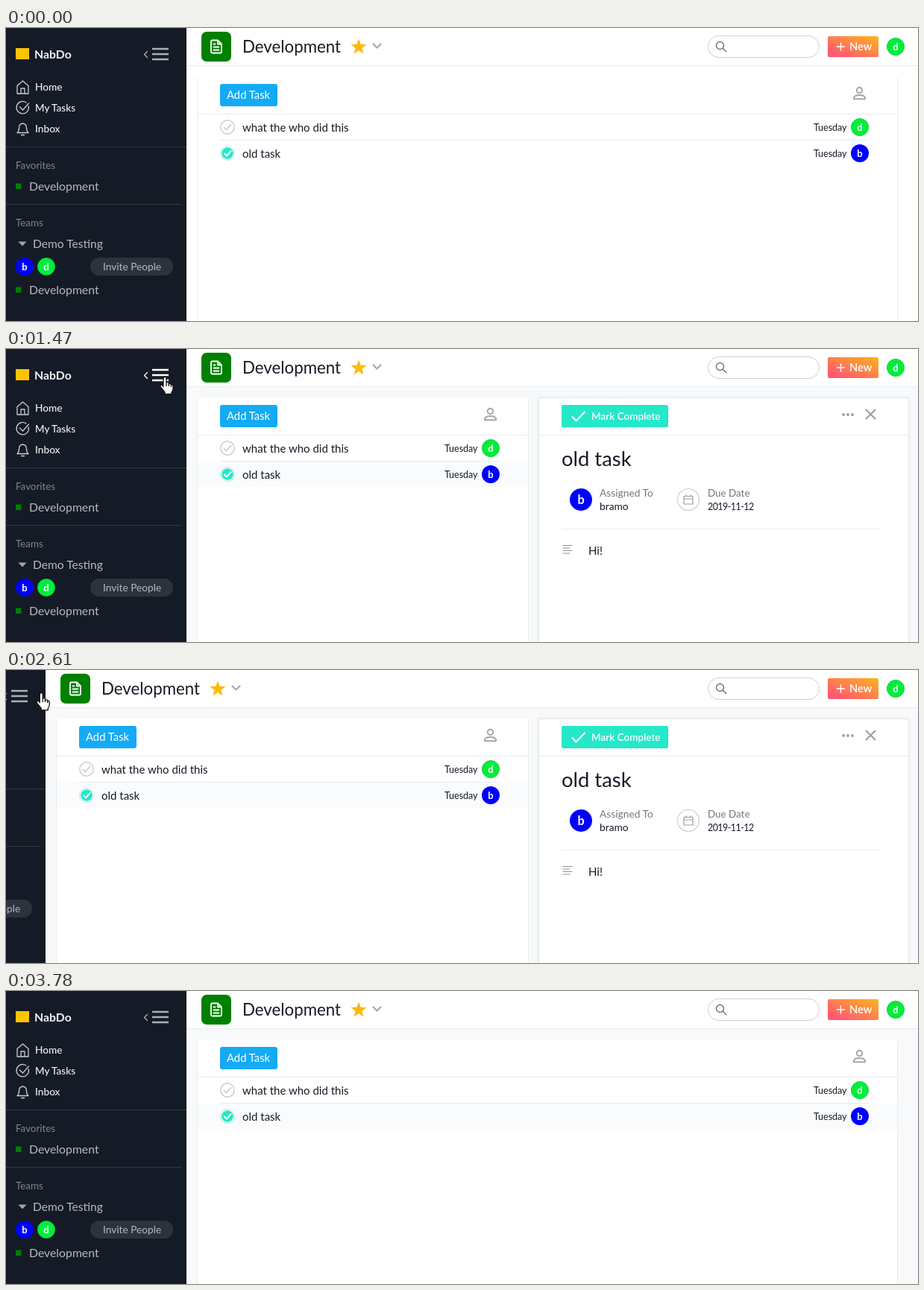
An HTML page that plays this animation: 1223x393 px, repeating every 4.24 s.

```html
<!DOCTYPE html>
<html lang="en">
<head>
<meta charset="utf-8">
<title>Task board</title>
<style>
html, body { margin: 0; height: 100%; overflow: hidden; background: #fff; }
svg { display: block; width: 100vw; height: 100vh; }
text { font-family: Lato, "Open Sans", sans-serif; fill: #151b26; }
.line { fill: none; stroke-linecap: round; stroke-linejoin: round; }
.rule { stroke: #e8ecee; }
.nav { font-size: 13.7px; font-weight: 500; fill: #f0f2f4; }
.muted { font-size: 13.4px; fill: #7f868f; }
.proj { font-size: 15.8px; fill: #b6babf; }
.row { font-size: 15px; }
.day { font-size: 12.5px; }
.label { font-size: 13.8px; fill: #6f7782; }
.value { font-size: 13.8px; }
.av { font-size: 13px; font-weight: 700; fill: #fff; text-anchor: middle; }
.btn { fill: #fff; }
</style>
</head>
<body>
<svg viewBox="0 0 1223 393">
  <defs>
    <linearGradient id="warm" x1="0" y1="1" x2="1" y2="0">
      <stop offset=".15" stop-color="#ff5a70"/><stop offset="1" stop-color="#ffb41c"/>
    </linearGradient>
    <g id="b"><circle r="12" fill="#00f"/><text class="av" y="4.5">b</text></g>
    <g id="d"><circle r="11.6" fill="#00ee3b" stroke="#12c43c" stroke-width=".8"/><text class="av" y="4.5">d</text></g>
    <path id="bars" class="line" style="stroke-linecap:butt" stroke-width="2.3" d="M-11-7H11M-11 0H11M-11 7H11"/>
  </defs>

  <rect id="page" width="1223" height="393"/>

  <!-- task list -->
  <rect class="wide" data-a="0" data-b="0" y="65" height="340" rx="3" fill="#fff"/>
  <rect id="row1" class="wide" data-a="0" data-b="0" y="116" height="34" fill="#f6f8f9"/>
  <rect id="row2" class="wide" data-a="0" data-b="0" y="151" height="34"/>
  <rect class="wide" data-a="0" data-b="0" y="115" height="1" fill="#e8ecee"/>
  <rect class="wide" data-a="30" data-b="38" y="150" height="1" fill="#e8ecee"/>
  <g id="left">
    <path class="rule" d="M256.5 67V393"/>
    <rect x="287" y="75" width="77" height="30" rx="3" fill="#14aaf5"/>
    <text class="btn" x="296" y="95" font-size="14.8">Add Task</text>
    <g class="line" stroke="#c9cccf" stroke-width="1.4">
      <circle cx="297" cy="133" r="9.2"/><path d="M292.5 133.5l3 3 6-7" stroke-width="1.7"/>
    </g>
    <circle cx="297" cy="168" r="9.3" fill="#fff" stroke="#a9e6dc"/>
    <circle cx="297" cy="168" r="7.8" fill="#25e8c8"/>
    <path class="line" stroke="#fff" stroke-width="2" d="M293 168.5l3 3 5.5-6.5"/>
    <text class="row" x="317" y="139">what the who did this</text>
    <text class="row" x="317" y="174">old task</text>
  </g>
  <g id="right">
    <path class="rule" d="M1195.5 67V393"/>
    <g class="line" stroke="#a3a6aa" stroke-width="2">
      <circle cx="1144.5" cy="83.5" r="3.7"/><path d="M1137 95.2v-1.6q1-3.6 7.5-3.6t7.5 3.6v1.6z"/>
    </g>
    <text class="day" x="1083" y="138">Tuesday</text><use href="#d" x="1145" y="133"/>
    <text class="day" x="1083" y="173">Tuesday</text><use href="#b" x="1145" y="168"/>
  </g>

  <!-- task detail, laid out at its resting place -->
  <g id="panel">
    <rect x="712" y="63" width="501" height="340" rx="4" fill="#151b26" opacity=".025"/>
    <rect x="714.5" y="65.5" width="496" height="340" rx="3" fill="#fff" stroke="#e3e7ea"/>
    <rect x="745" y="75" width="143" height="30" rx="2" fill="#25e8c8"/>
    <path class="line" stroke="#fff" stroke-width="2.2" d="M759.5 91l5 5.5L776 84.500"/>
    <text class="btn" x="785" y="95" font-size="13.5" font-weight="600">Mark Complete</text>
    <g fill="#9a9da1"><circle cx="1123" cy="88" r="1.9"/><circle cx="1129" cy="88" r="1.9"/><circle cx="1135" cy="88" r="1.9"/></g>
    <path class="line" stroke="#9a9da1" stroke-width="2" d="M1153.500 81.500l12 12m0-12l-12 12"/>
    <path class="rule" d="M715 115.500H1210M745 241.500H1172"/>
    <text x="745" y="157" font-size="27.400">old task</text>
    <use href="#b" transform="translate(771 202) scale(1.25)"/>
    <text class="label" x="796" y="198">Assigned To</text>
    <text class="value" x="796" y="216">bramo</text>
    <g class="line" stroke="#b4b8bc" stroke-width="1.2">
      <circle cx="915" cy="202" r="14.500" stroke="#cbcfd3"/>
      <path d="M909 197.500h12v10.500h-12zM909 201h12M912 195.500v2M918 195.500v2" stroke="#999da2"/>
    </g>
    <text class="label" x="941" y="198" style="font-size:13.4px">Due Date</text>
    <text x="941" y="216" font-size="12.400" letter-spacing="-.5">2019-11-12</text>
    <path class="line" stroke="#8d9196" stroke-width="1.200" d="M747 263.500h12M747 267h9M747 270.500h12M747 274h9"/>
    <text x="781" y="276" font-size="15">Hi!</text>
  </g>

  <!-- header -->
  <rect width="1223" height="50" fill="#fff"/>
  <path class="rule" d="M0 50.500H1223"/>
  <use href="#bars" x="33" y="25" stroke="#111"/>
  <g id="title">
    <rect x="262" y="5" width="40" height="40" rx="7" fill="#008000"/>
    <path class="line" stroke="#fff" stroke-width="1.8" d="M284 16.500h-7.500q-1.500 0-1.500 1.500v14q0 1.500 1.500 1.500h11q1.500 0 1.500-1.500V21.500zv5h5M278.500 25.500h7M278.500 29.500h7M278.500 21.500h2"/>
    <text x="317" y="33" font-size="22.300">Development</text>
    <path id="star" fill="#fcb90d"/>
    <path class="line" stroke="#a6a8ab" stroke-width="2.200" d="M492.500 21.500l5 5 5-5"/>
  </g>
  <g id="tools">
    <rect x="941.500" y="10.500" width="149" height="29" rx="14.500" fill="#fff" stroke="#cbd0d6"/>
    <g class="line" stroke="#6d7277" stroke-width="1.400"><circle cx="957.500" cy="23.500" r="5"/><path d="M961.300 27.300l4.500 4.500"/></g>
    <rect x="1102" y="11" width="68" height="28" rx="2" fill="url(#warm)"/>
    <path class="line" stroke="#fff" stroke-width="1.600" d="M1114.500 25h10M1119.500 20v10"/>
    <text class="btn" x="1131" y="30" font-size="14.700" font-weight="600">New</text>
    <use href="#d" x="1193" y="25"/>
  </g>

  <!-- sidebar -->
  <g id="side">
    <rect width="242" height="393" fill="#151b26"/>
    <rect x="13" y="27" width="18" height="15" fill="#ffc400"/>
    <text class="nav" x="38" y="41" style="font-size:15.8px;font-weight:700">NabDo</text>
    <g id="menu">
      <path class="line" stroke-width="1.300" d="M189.500 31.500l-4 4 4 4"/><use href="#bars" x="207" y="35"/>
    </g>
    <g class="line" stroke="#c9cdd1" stroke-width="1.300">
      <path d="M15 77.500l7.500-6.500 7.500 6.500v10.500h-15zM20 88v-7h5v7"/>
      <path d="M30.300 105a8.200 8.200 0 1 1-3.300-5M18.500 106l4 4 8-9"/>
      <path d="M15 140.500q2.500-2 2.500-6.500 0-5.500 5-6 5 .5 5 6 0 4.500 2.500 6.500zM20.500 143.500h4"/>
    </g>
    <text class="nav" x="39" y="84">Home</text>
    <text class="nav" x="39" y="112" style="font-size:13.5px">My Tasks</text>
    <text class="nav" x="39" y="140">Inbox</text>
    <path stroke="#333943" d="M0 159.500H242M0 236.500H235"/>
    <text class="muted" x="13" y="189">Favorites</text>
    <text class="muted" x="13" y="266">Teams</text>
    <path fill="#008000" d="M13 208.500h7.500v7.500H13zM13 347.500h7.500v7.500H13z"/>
    <text class="proj" x="31" y="218">Development</text>
    <text class="proj" x="31" y="357">Development</text>
    <path fill="#a0a4a9" d="M16.500 286.500h11l-5.500 6z"/>
    <text class="proj" x="36" y="295" style="font-size:15.6px">Demo Testing</text>
    <use href="#b" x="25" y="320"/><use href="#d" x="54" y="320"/>
    <rect x="113" y="308" width="111" height="24" rx="12" fill="#2d323c"/>
    <text class="proj" x="130" y="325" style="font-size:13.7px">Invite People</text>
  </g>

  <g id="scroll">
    <rect x="1209" width="14" height="393" fill="#f1f1f1"/>
    <rect x="1210" y="17" width="13" height="376" fill="#c1c1c1"/>
    <path fill="#8a8a8a" d="M1213 11.500l4-5 4 5z"/>
  </g>

  <g id="cursor" stroke-linejoin="round">
    <path id="hand" fill="#fff" stroke="#111" stroke-width="1.300" d="M-2 2Q0-2 2 2V9V8q2-1.500 3.200.500v1.500q2.300-1.300 3.200 1 2.400-.500 2.600 1.500V16q0 3-2 5v2.500H0V21L-6 13.500Q-6.500 10.500-3.500 11.500L-2 13.500zM2 9v4M5.200 10v3M8.400 11v3"/>
    <path id="beam" fill="none" stroke="#222" stroke-width="1.200" d="M-3.500-7.500H-1L0-6.500 1-7.500H3.500M0-6.500V6.500M-3.500 7.500H-1L0 6.500 1 7.500H3.500"/>
    <path id="arrow" fill="#fff" stroke="#111" d="M0 0V16l3.800-3.500 2.600 6 2.400-1-2.600-5.800h5.200z"/>
  </g>
</svg>
<script>
const LOOP = 4240;
const OPEN = 790, CLOSE = 3430, SLIDE = 282;
const FOLD = 1680, UNFOLD = 2574, FOLD_TIME = 220;
const FOLDED = 244, TRAVEL = 510, BAR = 17;

// time, x, y of the pointer tip
const path = [
  [170, 610, 352], [430, 537, 163], [1030, 537, 163], [1300, 228, 66], [1440, 213, 37],
  [2200, 213, 37], [2460, 34, 26], [2570, 38, 27], [2610, 46, 30], [2700, 160, 62],
  [2970, 606, 137], [3060, 690, 130], [3250, 1122, 93], [3340, 1158, 86],
  [3440, 1158, 86], [3740, 1010, 400]
];

const $ = id => document.getElementById(id);
const shift = (id, x, y = 0) => $(id).setAttribute("transform", `translate(${x} ${y})`);
const show = (id, on) => $(id).style.display = on ? "" : "none";
const wide = document.querySelectorAll(".wide");

$("star").setAttribute("d", "M" + Array.from({ length: 10 }, (_, i) => {
  const r = i % 2 ? 4.6 : 11, a = i * Math.PI / 5;
  return [473 + r * Math.sin(a), 25.5 - r * Math.cos(a)].map(v => v.toFixed(1));
}).join("L") + "z");

// cubic-bezier(.25, .1, .25, 1)
function ease(p) {
  if (p <= 0) return 0;
  if (p >= 1) return 1;
  let lo = 0, hi = 1, u;
  for (let i = 0; i < 16; i++) {
    u = (lo + hi) / 2;
    if (0.75 * u * (1 - u) + u ** 3 < p) lo = u; else hi = u;
  }
  return 0.3 * u * (1 - u) ** 2 + 3 * u * u * (1 - u) + u ** 3;
}

function pointer(t) {
  const i = path.findIndex(k => k[0] > t);
  if (i < 1) return null;
  const [a, b] = [path[i - 1], path[i]];
  const p = (t - a[0]) / (b[0] - a[0]);
  return [a[1] + (b[1] - a[1]) * p, a[2] + (b[2] - a[2]) * p];
}

function draw(t) {
  const fold = ease((t - FOLD) / FOLD_TIME) - ease((t - UNFOLD) / FOLD_TIME);
  const side = -Math.round(FOLDED * fold);
  const opened = t >= OPEN && t < CLOSE;
  const bar = t >= OPEN && t < OPEN + SLIDE ? BAR : 0;
  const away = 1 - ease((t - OPEN) / SLIDE) + ease((t - CLOSE) / SLIDE);
  const L = 257 + side, R = (opened ? 700 : 1195) - bar;

  $("page").setAttribute("fill", t < OPEN ? "#fff" : "#f7f9fa");
  shift("side", side);
  shift("title", Math.max(-194, side));
  shift("left", side);
  shift("right", R - 1195);
  shift("tools", -bar);
  shift("panel", Math.round(TRAVEL * away) - bar);
  show("panel", away < 1);
  show("scroll", bar);
  for (const e of wide) {
    const x = L + +e.dataset.a;
    e.setAttribute("x", x);
    e.setAttribute("width", R - e.dataset.b - x);
  }

  const at = pointer(t);
  show("cursor", at);
  const [x, y] = at || [-99, -99];
  const onList = x > L && x < R;
  const on1 = onList && y > 115 && y < 150;
  const on2 = onList && y >= 150 && y < 186;
  const onMenu = side > -200 && Math.abs(x - 207 - side) < 14 && y < 48;
  const onBars = x < 60 && y < 50;
  const onClose = x > 1145 && y > 76 && y < 100 && opened;
  const hand = on1 || on2 || onMenu || onBars || onClose;
  const beam = !hand && side <= -200 && x > 122 && x < 258 && y < 46;
  shift("cursor", x, y);
  show("hand", hand);
  show("beam", beam);
  show("arrow", !hand && !beam);
  show("row1", on1);
  $("row2").setAttribute("fill", on2 ? "#f6f8f9" : t < OPEN ? "#fff" : "#fafbfc");
  $("menu").setAttribute("stroke", onMenu ? "#fff" : "#a9b0b7");
}

function tick(now) {
  draw(now % LOOP);
  requestAnimationFrame(tick);
}
draw(0);
requestAnimationFrame(tick);
</script>
</body>
</html>
```
